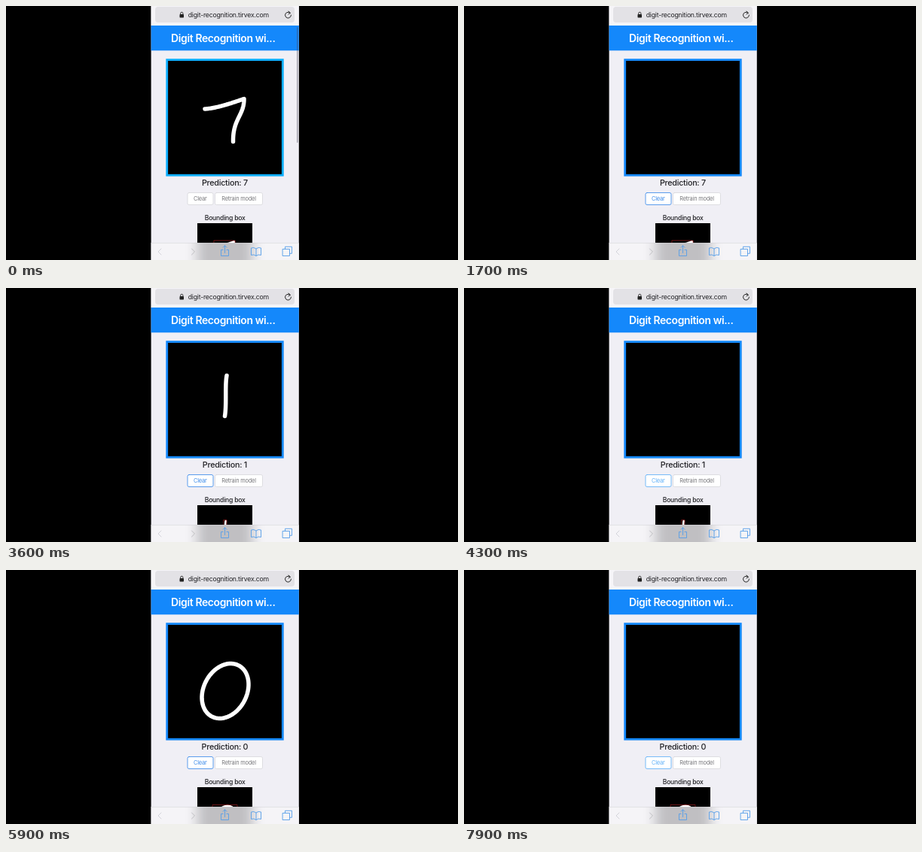
Animation, 600 px wide and 338 px high, one loop 8 s. Source, as an HTML page with a canvas:

```html
<!DOCTYPE html>
<html lang="en">
<head>
<meta charset="utf-8">
<title>Digit recognition</title>
<style>
html, body { margin: 0; width: 100%; height: 100%; overflow: hidden; background: #000; }
canvas { display: block; width: 600px; height: 338px; }
</style>
</head>
<body>
<canvas id="stage" width="600" height="338"></canvas>
<script>
const ctx = document.getElementById('stage').getContext('2d');
const LOOP = 8000;
const BLUE = '#1488fb', CYAN = '#0caeff', INK = '#222226', GREY = '#d9d9dc', MUTED = '#77777b';
const PHONE = { x: 192.6, w: 196.2 };
const PAD = { x: 212.3, y: 70.2, size: 156.4, edge: 2.8 };
const PEN = 5.5;

const clamp = v => Math.max(0, Math.min(1, v));
const mix = (a, b, k) => 'rgb(' + a.map((v, i) => Math.round(v + (b[i] - v) * k)) + ')';

// Cubic curve through two end points with two handles
const curve = (a, b, c, d, u) => a.map((_, i) => {
  const v = 1 - u;
  return v * v * v * a[i] + 3 * v * v * u * b[i] + 3 * v * u * u * c[i] + u * u * u * d[i];
});

// Pen position of each digit for u from 0 to 1
const pens = {
  7: u => u < 0.5
    ? curve([264, 137], [280, 136], [300, 129], [316, 123.5], u * 2)
    : curve([316, 123.5], [316, 146], [301, 150], [301.5, 180.5], u * 2 - 1),
  1: u => curve([293, 116.5], [290.5, 130], [293, 155], [290.5, 170.5], u),
  0: u => {
    const a = -1.07 - u * 2 * Math.PI;
    return [291 + 31 * Math.cos(a), 161 + 36.5 * Math.sin(a - 0.24)];
  }
};

const round = (digit, from, to, press) =>
  ({ digit, from, to, press, known: to + 50, clear: press + 150 });
const rounds = [round(7, -900, -400, 1550), round(1, 2000, 2300, 3600), round(0, 4600, 5250, 5800)];

function trace(digit, part = 1) {
  const steps = 80;
  return Array.from({ length: steps + 1 }, (_, i) => pens[digit](part * i / steps));
}

function box(x, y, w, h, color) {
  ctx.fillStyle = color;
  ctx.fillRect(x, y, w, h);
}

function pill(x, y, w, h, r, fill, edge) {
  ctx.beginPath();
  ctx.roundRect(x, y, w, h, r);
  ctx.fillStyle = fill;
  ctx.fill();
  if (edge) {
    ctx.strokeStyle = edge;
    ctx.lineWidth = 0.85;
    ctx.stroke();
  }
}

function text(str, x, y, size, color, weight = 400) {
  ctx.font = `${weight} ${size}px Inter, Roboto, sans-serif`;
  ctx.letterSpacing = -0.025 * size + 'px';
  ctx.textAlign = 'center';
  ctx.fillStyle = color;
  ctx.fillText(str, x, y);
}

function icon(d, color, width = 0.9) {
  ctx.strokeStyle = color;
  ctx.lineWidth = width;
  ctx.lineCap = ctx.lineJoin = 'round';
  ctx.stroke(new Path2D(d));
}

function drawDigit(digit, part) {
  ctx.beginPath();
  trace(digit, part).forEach(p => ctx.lineTo(...p));
  ctx.strokeStyle = '#fff';
  ctx.lineWidth = PEN;
  ctx.lineCap = ctx.lineJoin = 'round';
  ctx.stroke();
}

function addressBar() {
  box(PHONE.x, 0, PHONE.w, 26, '#f6f5f8');
  pill(198, 1, 185, 21, 4, '#e3e2e6');
  pill(230.5, 11, 5.5, 4.5, 0.7, '#222');
  icon('M231.7 11V9.8a1.6 1.6 0 0 1 3.2 0V11', '#222');
  text('digit-recognition.tirvex.com', 295.3, 15, 8.7, INK);
  icon('M377.2 9.3a3.9 3.9 0 1 0 1.2 2.8M375 7l2.4 2.2-2.4 1.6', '#222', 1);
}

function toolbar(x, w) {
  box(PHONE.x, 315, PHONE.w, 23, '#f5f4f7');
  ctx.save();
  ctx.beginPath();
  ctx.rect(PHONE.x, 315, PHONE.w, 23);
  ctx.clip();
  ctx.filter = 'blur(8px)';
  box(x, 290, w, 80, 'rgba(70,70,75,0.3)');
  ctx.restore();
  box(PHONE.x, 315, PHONE.w, 0.5, '#cfced3');
  icon('M206 323l-4 4 4 4', '#d0d0d6');
  icon('M246.5 323l4 4-4 4', '#b9b9be');
  const tint = '#559de9';
  icon('M288 324.5h-2.5v8h10v-8H293M290.5 328.5V319M288 321.3l2.5-2.5 2.5 2.5', tint);
  icon('M332 323q-3-2.5-6.5-1v9.5q3.5-1.5 6.5 1 3-2.5 6.5-1V322q-3.5-1.5-6.5 1v9.5', tint);
  icon('M367.5 323.5h9v9h-9zM370.5 323.5v-3.2h9v9h-3', tint);
}

function thumbnail(digit, x, w) {
  const y = 289, scale = w / 151;
  box(x, y, w, 27, '#000');
  ctx.save();
  ctx.translate(x, y);
  ctx.scale(scale, scale);
  ctx.translate(-PAD.x - PAD.edge, -PAD.y - PAD.edge);
  drawDigit(digit, 1);
  const points = trace(digit);
  const [low, high] = [Math.min, Math.max].map(pick =>
    [0, 1].map(axis => pick(...points.map(p => p[axis]))));
  ctx.strokeStyle = '#b02226';
  ctx.lineWidth = 1.3;
  ctx.strokeRect(low[0] - PEN / 2, low[1] - PEN / 2, high[0] - low[0] + PEN, high[1] - low[1] + PEN);
  ctx.restore();
}

function draw(t) {
  const now = rounds.filter(r => t >= r.from).pop();
  const shown = rounds.filter(r => t >= r.known).pop().digit;
  const pressed = t >= now.press;

  box(0, 0, 600, 338, '#000');
  box(PHONE.x, 0, PHONE.w, 338, '#f0eff5');
  addressBar();
  box(PHONE.x, 26, PHONE.w, 33.3, BLUE);
  text('Digit Recognition wi...', 288.3, 48, 13.9, '#fff', 600);

  const { x, y, size, edge } = PAD;
  box(x, y, size, size, pressed ? BLUE : CYAN);
  box(x + edge, y + edge, size - 2 * edge, size - 2 * edge, '#000');
  if (t < now.clear) drawDigit(now.digit, clamp((t - now.from) / (now.to - now.from)));

  text('Prediction: ' + shown, 290.4, 238.7, 10.75, INK, 500);
  const fade = clamp((t - now.clear - 150) / 300);
  const tint = pressed && mix([62, 140, 234], [96, 176, 248], fade);
  pill(241, 248.5, 34, 16, 2, '#fff', tint || GREY);
  text('Clear', 257.8, 259.2, 7.5, tint || MUTED);
  pill(277.5, 248.5, 63, 16, 2, '#fff', GREY);
  text('Retrain model', 309, 259.2, 7.4, MUTED);
  text('Bounding box', 290.7, 285.2, 8.6, INK, 500);
  thumbnail(shown, 254, 73);
  toolbar(254, 73);

  // The scroll indicator fades out at the start
  const bar = 1 - clamp((t - 100) / 300);
  if (bar) pill(386, 28, 1.5, 154, 0.7, `rgba(70,70,90,${0.45 * bar})`);
}

function tick() {
  draw(performance.now() % LOOP);
  requestAnimationFrame(tick);
}
tick();
</script>
</body>
</html>
```
